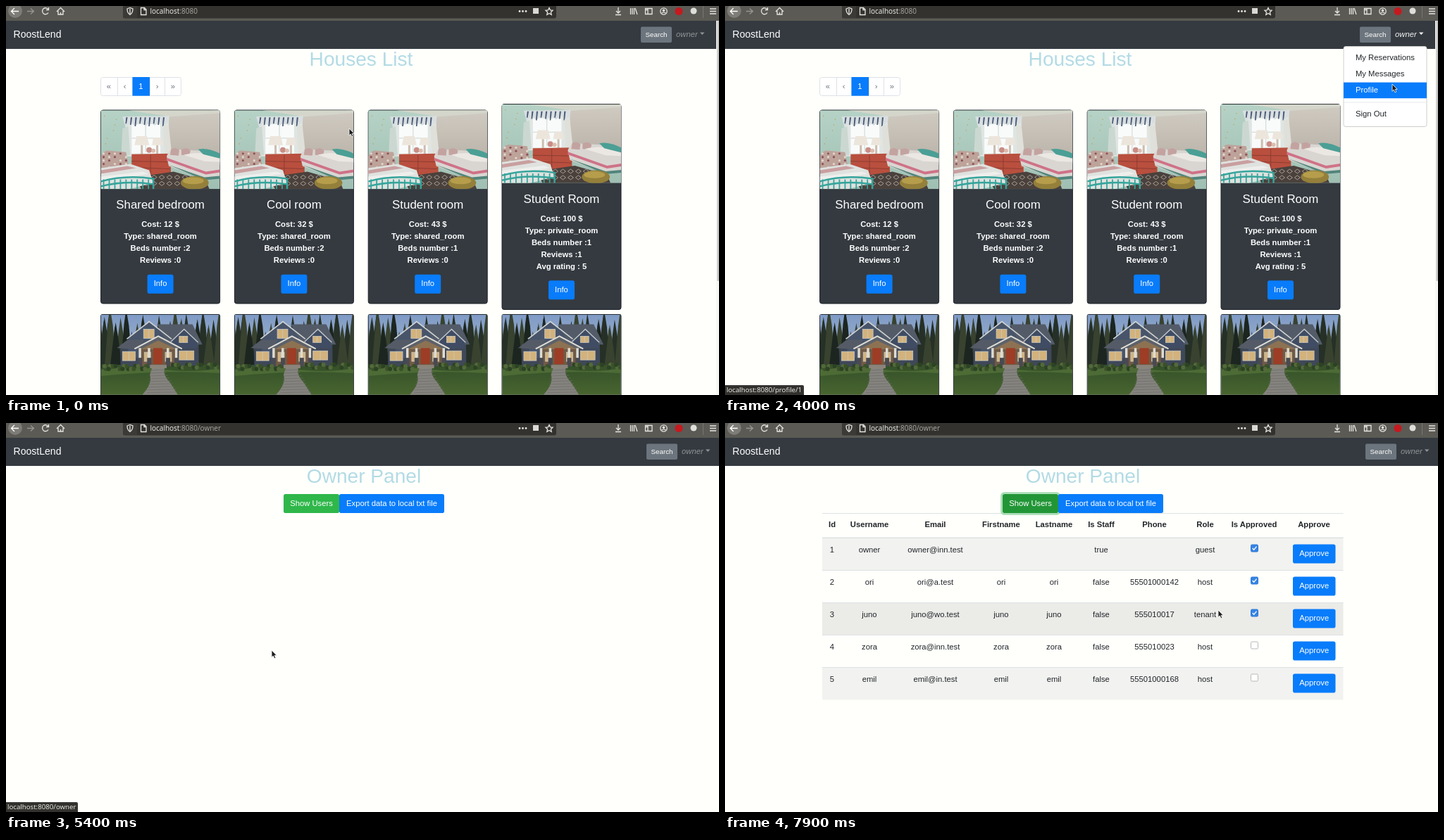
Recreate the animation shown at these times as an HTML page. Size 1012 px wide and 553 px high, loop 8 s.

```html
<!DOCTYPE html>
<html lang="en">
<head>
<meta charset="utf-8">
<title>House rental demo</title>
<style>
  html, body { margin: 0; width: 100%; height: 100%; overflow: hidden; background: #fffffc; }
  #stage { display: block; width: 1012px; height: 553px; font: 11.25px "Liberation Sans", Arial, sans-serif; }
  text { fill: #212529; white-space: pre; }
  .c { text-anchor: middle; }
  .b { font-weight: bold; }
  .w { fill: #fff; }
  .h1 { font-size: 28.1px; text-anchor: middle; }
  .card { font-size: 16.87px; text-anchor: middle; fill: #fff; }
  .line { fill: none; stroke: #e6e5e1; stroke-width: 1.3; }
  #url { font: 10px "Open Sans", sans-serif; }
  #status { position: absolute; left: 0; top: 539px; height: 14px; padding: 0 3px 0 2px; background: #33322e;
    color: #f0f0ec; font: 9.7px/14px "Open Sans", sans-serif; border-radius: 0 2px 0 0; white-space: pre; }
</style>
</head>
<body>
<svg id="stage" viewBox="0 0 1012 553"></svg>
<div id="status"></div>
<script>
const BLUE = '#087cfb', DARK = '#343a40', GREY = '#6c757d';
const $ = id => document.getElementById(id);
const range = (n, make) => Array.from({ length: n }, (_, i) => make(i)).join('');
const text = (x, y, s, cls = '', extra = '') => `<text x="${x}" y="${y}" class="${cls}" ${extra}>${s}</text>`;
const rect = (x, y, w, h, fill, extra = '') => `<rect x="${x}" y="${y}" width="${w}" height="${h}" fill="${fill}" ${extra}/>`;
const path = (d, fill, extra = '') => `<path d="${d}" fill="${fill}" ${extra}/>`;
const dot = (x, y, r, fill) => `<circle cx="${x}" cy="${y}" r="${r}" fill="${fill}"/>`;
const line = (d, extra = '') => `<path class="line" d="${d}" ${extra}/>`;
const button = (x, y, w, h, label, fill, id = '') =>
  rect(x, y, w, h, fill, `rx="2.8" ${id && `id="${id}"`}`) + text(x + w / 2, y + h / 2 + 3, label, 'c w');
const group = (id, body) => `<g id="${id}">${body}</g>`;
const shade = (id, from, to) => `<linearGradient id="${id}" x2="0" y2="1"><stop stop-color="${from}"/><stop offset="1" stop-color="${to}"/></linearGradient>`;

function bedroom() {
  return rect(0, 0, 170, 113, 'url(#mint)')
    + path('M96 4L170 0V78H98Z', 'url(#plaster)') + path('M40 0H170V4L100 9Z', '#d5d6cb')
    + range(22, i => dot(5 + (i * 37) % 98, 8 + (i * 23) % 48, .8, '#bba565'))
    + rect(35, 12, 62, 54, '#dfe5e2') + rect(44, 20, 41, 42, '#f8fbfa')
    + line('M64 22V60M44 40H84', 'style="stroke:#d6dedb"')
    + path('M31 9L98 8 97 17 90 22 84 16 77 22 70 16 64 23 56 16 49 23 43 17 35 24Z', '#d9dfe0')
    + range(9, i => path(`M${36 + i * 6.6} 10l2.2 0-1.5 ${9 + i % 3 * 2}-1.6 0Z`, '#4a5a78'))
    + path('M31 26L39 23 42 64 29 66Z', '#cbd8d1') + path('M89 22L97 22 101 60 91 62Z', '#dfe0d9')
    + path('M51 37H66L69 50H48ZM75 39H86L88 50H73Z', '#ece5db')
    + rect(57, 50, 3, 13, '#cdbdb0') + rect(79, 50, 3, 13, '#cdbdb0')
    + dot(69, 57, 4, '#c98d86') + dot(75, 58, 3, '#dcbdaf')
    + path('M44 63L100 62V92L95 96 44 91Z', '#b94f3e')
    + line('M44 73L99 74M44 82L99 84M71 64V94', 'style="stroke:#8d3d33;stroke-width:1"')
    + path('M48 96L104 88 150 101 155 113H58Z', '#4a413d')
    + range(16, i => path(`M${61 + i % 8 * 11} ${96 + (i >> 3) * 9}l4-3 4 3-4 3Z`, 'none', 'stroke="#aaa095" stroke-width="1"'))
    + path('M94 66Q97 56 106 56L142 58 170 68V97L148 99 97 80Z', '#d9d6d2')
    + path('M94 68L150 88 170 85V89L150 92 94 72Z', '#cf7287') + path('M96 78L148 96 170 94V98L148 100Z', '#51857c')
    + path('M100 56q7-4 12 1l-1 8-12-1ZM115 56q8-4 13 2l-2 7-11-1Z', '#c3a3a0')
    + path('M118 64Q138 59 151 63L170 68V74L148 73Z', '#ebe7e2')
    + path('M139 56Q152 53 170 62V69L146 63Z', '#4b9f95')
    + path('M0 66Q5 56 12 58L36 60 40 80 0 86Z', '#bda39a')
    + range(20, i => dot(4 + i % 5 * 8, 62 + (i >> 2) * 5, 1.6, i % 2 ? '#8d5258' : '#e4d6cd'))
    + path('M0 83L42 77 69 86 75 104 40 113H0Z', '#dfe2df') + path('M0 86L38 80 50 83 0 91Z', '#c99fa0')
    + path('M0 95L60 88 68 91 0 103Z', '#eeefed')
    + line('M0 102Q35 92 75 98V113M0 109Q35 100 75 106', 'style="stroke:#35a59c;stroke-width:2.5"')
    + range(9, i => line(`M${4 + i * 8} 99v14`, 'style="stroke:#35a59c;stroke-width:1.8"'))
    + '<ellipse cx="134" cy="104" rx="20" ry="9.5" fill="#94803a"/><ellipse cx="132" cy="101" rx="15" ry="5" fill="#b59d4c"/>';
}

function house() {
  const tree = i => {
    const x = (i * 47) % 180 - 4, top = (i * 29) % 32 - 12 + (x > 40 && x < 100 ? 12 : 0);
    return path(`M${x - 8} 76L${x - 3} ${top + 22} ${x} ${top} ${x + 4} ${top + 24} ${x + 9} 76Z`, ['#263027', '#38422f', '#1c251f'][i % 3]);
  };
  const pane = (x, y, w, h) => rect(x, y, w, h, '#d3b27b', 'stroke="#c9cac6" stroke-width=".8"')
    + line(`M${x + w / 2} ${y}v${h}`, 'style="stroke:#c9cac6;stroke-width:.8"');
  return rect(0, 0, 170, 115, 'url(#sky)') + range(38, tree)
    + rect(0, 72, 170, 43, 'url(#lawn)') + path('M0 79Q50 74 92 79T170 77V84Q90 79 0 88Z', '#4d6b35')
    + rect(28, 42, 112, 32, '#3f4858')
    + path('M39 34L69 11 99 34V62H39Z', '#47546a') + path('M80 14H131L145 43H96Z', '#535b68')
    + path('M37 35L69 10 101 35', 'none', 'stroke="#cdd0d1" stroke-width="1.7"')
    + path('M23 48L38 36H62L52 50Z', '#555b66') + path('M102 37L119 22 138 39V48H102Z', '#3f4c63')
    + path('M100 39L119 21 139 40', 'none', 'stroke="#c3c8ca" stroke-width="1.4"')
    + pane(61, 21, 15, 13) + pane(112, 31, 12, 9) + pane(31, 53, 18, 13) + pane(112, 52, 21, 13)
    + path('M49 49L82 31 115 49Z', '#5d6169') + path('M56 50L82 37 109 50Z', '#8c7253')
    + path('M48 49L82 31 116 49', 'none', 'stroke="#deddd6" stroke-width="2"')
    + rect(57, 50, 50, 24, '#705a45') + rect(75, 48, 13, 23, '#9d3d26') + pane(62, 54, 9, 13) + pane(92, 54, 9, 13)
    + [54, 67, 94, 106].map(x => rect(x, 48, 3.5, 17, '#dedcd3') + rect(x - 1, 62, 6, 12, '#494a52')).join('')
    + rect(70, 72, 24, 5, '#8a847a')
    + range(40, i => dot((i * 13) % 68 + (i % 2 ? 0 : 103), 72 + i % 4 * 2, 3, ['#2c4224', '#53693a', '#3a5129'][i % 3]))
    + path('M73 77H91Q88 86 99 98L110 115H59Q74 99 70 86Z', '#85837e')
    + range(9, i => line(`M${71 - i * .7} ${80 + i * 4}l${20 + i * 3}-1`, 'style="stroke:#6c6c69;stroke-width:.7"'));
}

function card(x, y, title, facts) {
  const h = 208 + facts.length * 17;
  return rect(x + .5, y + .5, 169, h - 1, DARK, 'rx="3" stroke="#202327"')
    + `<use href="#bedroom" x="${x + .5}" y="${y + .8}" width="169" height="112"/>`
    + text(x + 85, y + 140.5, title, 'card')
    + facts.map((f, i) => text(x + 85, y + 166.7 + i * 17, f, 'c b w')).join('')
    + button(x + 66.5, y + h - 41.8, 37, 27, 'Info', BLUE);
}

function homePage() {
  const left = i => 134.1 + i * 189.8;
  const cells = [134, 158, 179, 204, 225, 249];
  const facts = (cost, type, beds, reviews) =>
    [`Cost: ${cost} $`, `Type: ${type}_room`, `Beds number :${beds}`, `Reviews :${reviews}`];
  return text(504, 84.5, 'Houses List', 'h1', 'style="fill:#b3dbe5"')
    + rect(134.5, 101.5, 114, 26, '#fff', 'rx="3" stroke="#dee2e6"')
    + [...'«‹1›»'].map((s, i) => (i === 2 ? rect(179.5, 101, 24.5, 26.7, BLUE) : line(`M${cells[i + (i < 2)]}.5 101v27`, 'style="stroke:#dee2e6;stroke-width:1"'))
      + text((cells[i] + cells[i + 1]) / 2, 117.7, s, 'c', `style="fill:${i === 2 ? '#fff' : GREY}"`)).join('')
    + card(left(0), 147.5, 'Shared bedroom', facts(12, 'shared', 2, 0))
    + card(left(1), 147.5, 'Cool room', facts(32, 'shared', 2, 0))
    + card(left(2), 147.5, 'Student room', facts(43, 'shared', 1, 0))
    + card(left(3), 139, 'Student Room', [...facts(100, 'private', 1, 1), 'Avg rating : 5'])
    + range(4, i => rect(left(i), 438, 170, 120, '#202327', 'rx="3"')
      + `<use href="#house" x="${left(i) + .7}" y="438.7" width="168.6" height="114"/>`)
    + rect(1008, 21, 4, 532, '#f6f6f3') + rect(1009.5, 21, 2.5, 370, '#c2c2be', 'rx="1.2"');
}

function profilePage() {
  const fields = [['Username:', 'owner'], ['Email:', 'owner@inn.test'], ['Firstname:', ''], ['Lastname:', ''], ['Phone:', ''], ['Role:', 'owner']];
  return text(508, 84.5, 'Profile', 'h1', 'style="fill:#2c3e50"') + rect(138, 101, 739.5, 291, '#e8ebea', 'rx="3.5"')
    + fields.map(([k, v], i) => text(359, 157.3 + i * 28.4, `<tspan class="b">${k}</tspan>${v && ' ' + v}`, 'c', 'style="fill:#2c3e50"')).join('')
    + button(319, 316, 79.5, 27, 'OwnerPanel', BLUE, 'panelButton')
    + rect(616, 147, 200, 200, '#fdfdfb')
    + path('M616 347V326Q618 320 628 317L672 300Q683 296 685 288L692 280Q686 273 687 255Q679 253 677 239Q674 232 677 226L676 201Q677 177 697 173Q716 168 734 173Q739 179 748 181Q754 188 754 207L752 226Q758 233 755 241Q753 252 746 255Q746 272 739 280L746 285Q749 296 760 300L804 317Q814 320 816 327V347Z', '#d4d4d0')
    + button(489, 414, 37.5, 27, 'Edit', GREY);
}

const columns = [152, 205, 298.5, 392, 467, 534, 609.5, 681.5, 751, 836];
const users = [
  ['owner', 'owner@inn.test', '', '', 'true', '', 'guest'],
  ['ori', 'ori@a.test', 'ori', 'ori', 'false', '55501000142', 'host'],
  ['juno', 'juno@wo.test', 'juno', 'juno', 'false', '555010017', 'tenant'],
  ['zora', 'zora@inn.test', 'zora', 'zora', 'false', '555010023', 'host'],
  ['emil', 'emil@in.test', 'emil', 'emil', 'false', '55501000168', 'host'],
];

function userTable() {
  const heads = ['Id', 'Username', 'Email', 'Firstname', 'Lastname', 'Is Staff', 'Phone', 'Role', 'Is Approved', 'Approve'];
  const row = (user, i) => {
    const y = 163.5 + i * 46, checked = i < 3;
    return rect(138, y, 739.5, 46, 'none', `id="row${i}"`) + rect(138, y - .5, 739.5, 1, '#dee2e4')
      + [i + 1, ...user].map((s, j) => text(columns[j], y + 20, s, 'c')).join('')
      + rect(746.5, y + 9.5, 10, 10, checked ? '#3584e4' : '#fff', `rx="1.5" stroke="${checked ? '#2c78d6' : '#b9b9b6'}"`)
      + (checked ? line(`M748.7 ${y + 14.5}l2 2.2 3.8-4.5`, 'style="stroke:#fff"') : '')
      + button(806, y + 9, 60.5, 27, 'Approve', BLUE);
  };
  return rect(138, 128, 739.5, 1, '#dee2e4') + heads.map((s, j) => text(columns[j], 148, s, 'c b')).join('')
    + users.map(row).join('') + rect(138, 162.5, 739.5, 1.3, '#dee2e4');
}

function panelPage() {
  return text(508, 84.5, 'Owner Panel', 'h1', 'style="fill:#b3dbe5"')
    + group('table', userTable())
    + rect(392.5, 99.5, 82, 30, 'none', 'id="ring" rx="4" stroke="#a4dcb1" stroke-width="2.6"')
    + button(394, 101, 79, 27, 'Show Users', '#2fb74a', 'usersButton')
    + button(473, 101, 149, 27, 'Export data to local txt file', BLUE);
}

function browserBar() {
  return rect(0, 0, 1012, 21, '#5b5a54') + rect(166, -4, 615, 21.5, '#33322e', 'rx="3"') + rect(166, 0, 20, 17, '#3b3a36')
    + dot(13, 7, 10, '#7d7c76') + line('M18 7.5H8M12 3L7.5 7.5 12 12', 'style="stroke:#fff"')
    + line('M30 7.5H39M35 3.5L39.5 7.5 35 11.5', 'style="stroke:#96958e"')
    + line('M60 5A4.5 4.5 0 1 0 60 9.5M60.5 2V5.5H57') + line('M72 8L77.5 2.5 83 8M74 7V12H81V7M77.5 12V9')
    + line('M172 4L176 2.5 180 4Q180 10 176 12.5 172 10 172 4ZM176 4V11') + line('M191.5 2.5H196.5L199 5V12.5H191.5ZM196 3V5.5H199')
    + [729, 733.5, 738].map(x => dot(x, 7.5, 1.4, '#e6e5e1')).join('') + rect(748, 3, 8, 8, '#d9d8d4')
    + line('M771 2.5L772.6 6 776 6.3 773.4 8.8 774.2 12.3 771 10.4 767.8 12.3 768.6 8.8 766 6.3 769.4 6Z')
    + line('M869 2V9.5M866 7L869 10 872 7M865 12.5H873') + line('M886.5 3V12M889 3V12M891.5 3V12M893 3L896 12')
    + line('M907.5 3.5H917V11.5H907.5ZM911 3.5V11.5M908 5.5H910.5')
    + '<circle class="line" cx="933.5" cy="7.5" r="4.7"/>' + dot(933.5, 6.2, 1.7, '#e6e5e1') + line('M930.5 10.3Q933.5 7.5 936.5 10.3')
    + dot(955, 7.5, 5.5, '#c5191f') + dot(976, 7, 4.5, '#dededb') + rect(989, 0, 1, 17, '#777670')
    + line('M999 4H1008M999 7.5H1008M999 11H1008')
    + text(204.5, 11.3, '<tspan fill="#f4f4f0">localhost</tspan><tspan fill="#a9a8a2" id="route"></tspan>', '', 'id="url"');
}

function menu() {
  return rect(878, 57.5, 118, 114, '#fff', 'rx="3" stroke="#cfcfcc"') + rect(878.5, 136.5, 117, 1, '#e7eaec')
    + ['My Reservations', 'My Messages', 'Profile'].map((s, i) =>
      rect(878, 63.4 + i * 22.6, 118, 22.6, BLUE, `id="hover${i}"`) + text(895, 77.3 + i * 22.6, s, '', `id="item${i}"`)).join('')
    + text(895, 157, 'Sign Out');
}

$('stage').innerHTML = shade('mint', '#b6d2c6', '#a0bfb3') + shade('plaster', '#d0cbc2', '#b8b0a6')
  + shade('sky', '#7f9bc6', '#bcc6d0') + shade('lawn', '#34502a', '#48652f')
  + `<symbol id="bedroom" viewBox="0 0 170 113" preserveAspectRatio="none">${bedroom()}</symbol>
  <symbol id="house" viewBox="0 0 170 115" preserveAspectRatio="none">${house()}</symbol>`
  + rect(0, 0, 1012, 553, '#fffffc') + browserBar() + rect(0, 21, 1012, 40, DARK)
  + text(10.5, 44.7, 'RoostLend', 'w', 'style="font-size:14.06px"')
  + group('account', rect(901, 29.5, 44, 22.5, GREY, 'rx="2"') + text(923, 43.5, 'Search', 'c w', 'style="font-size:9.84px"')
    + group('userLink', text(951, 44, 'owner', '', 'font-style="italic" style="fill:inherit"') + '<path d="M985 37.5H991.5L988.2 41Z"/>'))
  + group('home', homePage()) + group('profile', profilePage()) + group('panel', panelPage()) + group('menu', menu())
  + group('arrow', path('M0 0V10.2L2.3 8.1 4 11.8 5.8 11 4.2 7.4H7.2Z', '#1c1c1c', 'stroke="#fff" stroke-width=".8"'))
  + group('hand', path('M-1.2 .5Q0-.8 1.2.5V4.3L5 5.3Q6.3 5.8 6 7.4L5.2 11.8H-1.2L-4.6 7.5Q-4.6 6-3 6.4L-1.2 7.6Z', '#fff', 'stroke="#222" stroke-width=".9"'));

// [ms, x, y]
const cursorPath = [
  [0, 487, 174], [300, 487, 174], [400, 671, 250], [500, 671, 250], [900, 800, 150], [1400, 973, 41], [1500, 971, 40.5],
  [2400, 971, 40.5], [2700, 969, 49], [3200, 969, 49], [3600, 949, 113], [3700, 949, 113], [3800, 947, 111], [4000, 947, 111],
  [4100, 945, 112], [4200, 945, 112], [4800, 420, 326], [5200, 377, 323], [5600, 377, 323], [6500, 437, 129],
  [6600, 434, 120], [6700, 433, 114.5], [7500, 433, 114.5], [7600, 457, 116], [7700, 457, 116], [7900, 700, 266], [8000, 700, 266],
];

function cursorAt(t) {
  const i = cursorPath.findIndex(p => p[0] > t);
  const [t0, x0, y0] = cursorPath[i - 1], [t1, x1, y1] = cursorPath[i];
  const k = (t - t0) / (t1 - t0);
  return [x0 + (x1 - x0) * k, y0 + (y1 - y0) * k];
}

const show = (id, on) => $(id).style.display = on ? '' : 'none';
const within = (t, a, b) => t >= a && t < b;

function statusAt(t) {
  if (within(t, 1400, 3400)) return '/#';
  if (within(t, 3400, 3500)) return '/reservations';
  if (within(t, 3500, 3800)) return '/messages';
  if (within(t, 3800, 4100)) return '/profile/1';
  return within(t, 5000, 5500) ? '/owner' : '';
}

function draw(t) {
  const page = t < 4100 ? 'home' : t < 5300 ? 'profile' : 'panel';
  const [x, y] = cursorAt(t);
  for (const id of ['home', 'profile', 'panel']) show(id, id === page);
  $('route').textContent = ':8080' + { home: '', profile: '/profile/1', panel: '/owner' }[page];
  $('account').setAttribute('transform', `translate(${page === 'home' ? 0 : 8} 0)`);
  $('userLink').setAttribute('fill', within(t, 1400, 4100) ? '#f4f4f4' : within(t, 4100, 4300) ? '#b9bbbd' : '#919497');

  show('menu', within(t, 1800, 4100));
  const active = t < 3300 ? -1 : Math.floor((y - 63.4) / 22.6);
  for (let i = 0; i < 3; i++) {
    show('hover' + i, i === active);
    $('item' + i).style.fill = i === active ? '#fff' : '#212529';
  }

  $('panelButton').setAttribute('fill', t >= 5000 ? '#0069d9' : BLUE);
  $('usersButton').setAttribute('fill', t < 6600 ? '#2fb74a' : '#229637');
  show('table', t >= 7200);
  show('ring', t >= 7200);
  users.forEach((_, i) => {
    const hovered = y >= 163.5 + i * 46 && y < 209.5 + i * 46;
    $('row' + i).setAttribute('fill', hovered ? '#ebebe8' : i % 2 ? 'none' : '#f2f2f0');
  });

  const route = statusAt(t);
  show('status', route);
  $('status').textContent = 'localhost:8080' + route;

  const hand = within(t, 1400, 3300) || within(t, 5000, 5300) || within(t, 6600, 7800);
  show('hand', hand);
  show('arrow', !hand);
  $(hand ? 'hand' : 'arrow').setAttribute('transform', `translate(${x} ${y})`);
}

function tick() {
  draw(Math.floor(performance.now() % 8000 / 100) * 100);
  requestAnimationFrame(tick);
}
tick();
</script>
</body>
</html>
```
